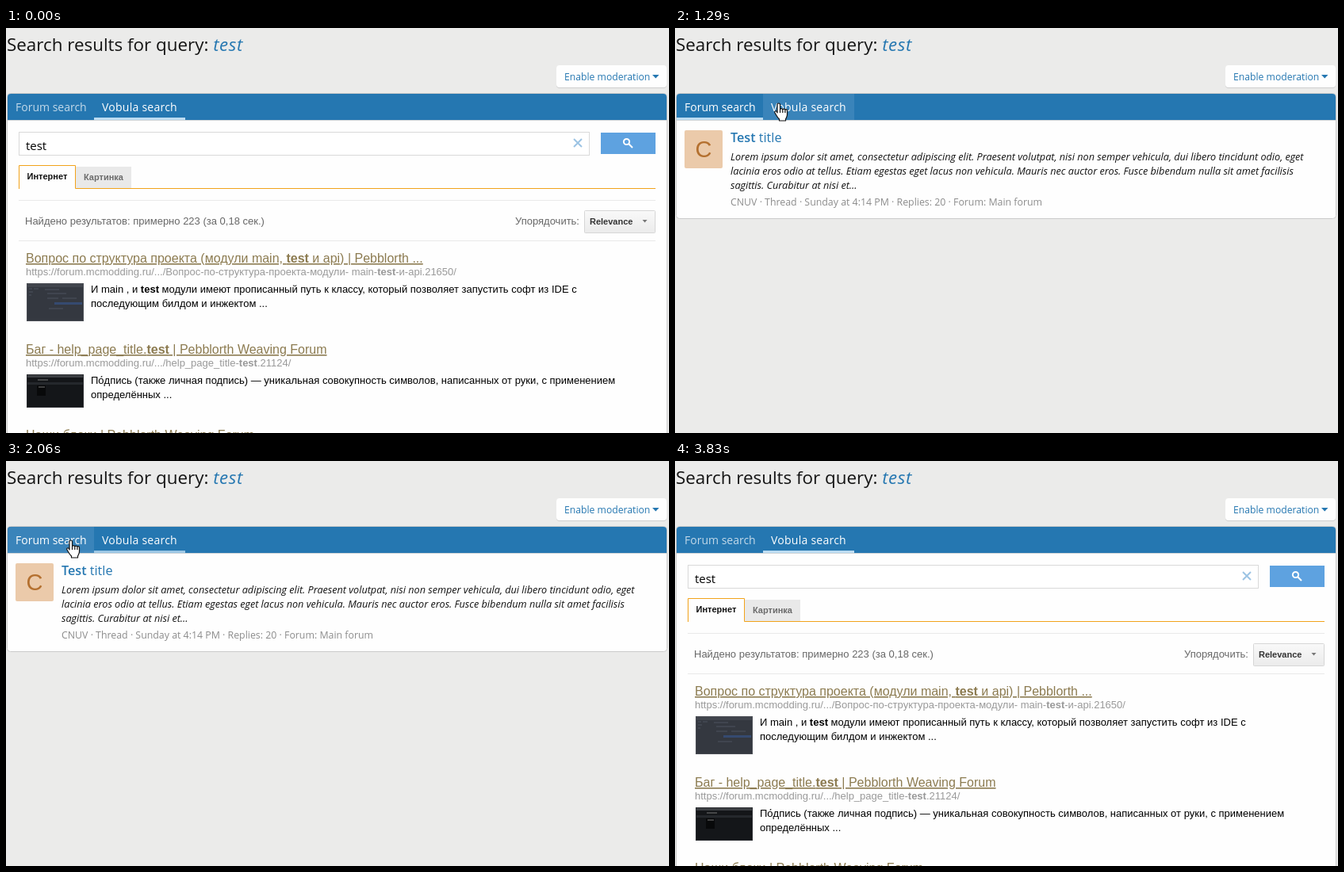
Animation of 836x511 px, one loop 4150 ms. Source, as an HTML page:

```html
<!DOCTYPE html>
<html lang="en">
<head>
<meta charset="utf-8">
<title>Search results</title>
<style>
html, body { margin: 0; width: 100%; height: 100%; overflow: hidden; background: #ebebea; }
svg { display: block; width: 836px; height: 511px; }
text { white-space: pre; }
.ui { font-family: "Open Sans", "Noto Sans", sans-serif; }
.web { font-family: "Liberation Sans", Arial, sans-serif; font-size: 13px; }
.b { font-weight: bold; }
.blue { fill: #2577b1; }
.small { font-size: 11px; font-weight: bold; }
.link { font-size: 16px; fill: #8c7b50; text-decoration: underline; }
.url { fill: #999; }

.a { animation: 4150ms step-end infinite; }
.forum-pane { animation-name: forum-pane; }
.web-pane { animation-name: web-pane; }
.forum-hover { animation-name: forum-hover; }
.web-hover { animation-name: web-hover; }
.forum-line { animation-name: forum-line; }
.web-line { animation-name: web-line; }
.forum-label { animation-name: forum-label; }
.web-label { animation-name: web-label; }
.cursor { animation-name: move; }
.hand { animation-name: hand; }
.arrow { animation-name: arrow; }

@keyframes forum-pane {
  0%, 34.69%, 68.19%, 100% { opacity: 0; }
  16.38%, 49.63% { opacity: 1; }
}
@keyframes web-pane {
  0%, 34.69%, 68.19%, 100% { opacity: 1; }
  16.38%, 49.63% { opacity: 0; }
}
@keyframes forum-hover {
  0%, 29.39%, 60.72%, 100% { opacity: 0; }
  10.6%, 38.55% { opacity: 0; animation-timing-function: linear; }
  12.28%, 40.48% { opacity: 1; }
  25.54%, 57.8% { opacity: 1; animation-timing-function: linear; }
}
@keyframes web-hover {
  0%, 40.48%, 75.66%, 100% { opacity: 0; }
  25.54%, 57.8% { opacity: 0; animation-timing-function: linear; }
  29.39%, 60.72% { opacity: 1; }
  37.5%, 71.8% { opacity: 1; animation-timing-function: linear; }
}
@keyframes forum-line {
  0%, 39.27%, 72%, 100% { opacity: 0; }
  16.38% { opacity: 0; animation-timing-function: linear; }
  21.5%, 53.25% { opacity: 1; }
  34.69% { opacity: 1; animation-timing-function: linear; }
  49.63% { opacity: .05; animation-timing-function: linear; }
  68.19% { opacity: .6; animation-timing-function: linear; }
}
@keyframes web-line {
  0%, 39.27%, 72%, 100% { opacity: 1; }
  16.38% { opacity: 1; animation-timing-function: linear; }
  21.5%, 53.25% { opacity: 0; }
  34.69% { opacity: 0; animation-timing-function: linear; }
  49.63% { opacity: .8; animation-timing-function: linear; }
  68.19% { opacity: .45; animation-timing-function: linear; }
}
@keyframes forum-label {
  0%, 38%, 72%, 100% { opacity: .72; }
  10.6%, 38.55% { opacity: .72; animation-timing-function: linear; }
  12.28%, 40.48% { opacity: 1; }
  34.69% { opacity: 1; animation-timing-function: linear; }
  68.19% { opacity: .9; animation-timing-function: linear; }
}
@keyframes web-label {
  0%, 29.39%, 60.72%, 100% { opacity: 1; }
  16.38%, 49.63% { opacity: 1; animation-timing-function: linear; }
  21.5%, 53.25% { opacity: .72; }
  25.54%, 57.8% { opacity: .72; animation-timing-function: linear; }
}
@keyframes hand {
  0%, 73.73%, 100% { opacity: 0; }
  10.6% { opacity: 1; }
}
@keyframes arrow {
  0%, 10.6%, 92.28%, 100% { opacity: 0; }
  1.68%, 73.73% { opacity: 1; }
}
@keyframes move {
  0%, 1.68% { transform: translate(722px, 412px); animation-timing-function: steps(2); }
  5.3% { transform: translate(430px, 262px); animation-timing-function: steps(2); }
  8.91% { transform: translate(130px, 128px); animation-timing-function: steps(2); }
  12.28% { transform: translate(39px, 91px); }
  21.92% { transform: translate(39px, 91px); animation-timing-function: steps(3); }
  27.46% { transform: translate(125px, 94px); }
  36.62% { transform: translate(125px, 94px); animation-timing-function: steps(2); }
  40.48% { transform: translate(92px, 95px); }
  42.16% { transform: translate(13px, 96px); }
  44.09% { transform: translate(76px, 99px); }
  55.18% { transform: translate(76px, 99px); animation-timing-function: steps(3); }
  60.72% { transform: translate(121px, 102px); }
  62.65% { transform: translate(123px, 102px); }
  64.57% { transform: translate(124px, 102px); }
  70.12% { transform: translate(124px, 102px); animation-timing-function: steps(5); }
  79.27% { transform: translate(486px, 289px); animation-timing-function: steps(6); }
  90.6%, 100% { transform: translate(757px, 493px); }
}
</style>
</head>
<body>
<svg viewBox="0 0 836 511">
  <defs>
    <linearGradient id="grey" x2="0" y2="1">
      <stop stop-color="#f9f9f9"/><stop offset="1" stop-color="#ebebeb"/>
    </linearGradient>
  </defs>

  <g class="ui">
    <text x="1" y="29" font-size="22.4" fill="#141414">Search results for query: <tspan class="blue" font-style="italic" letter-spacing=".6">test</tspan></text>
    <rect x="694" y="48" width="139" height="28" rx="4" fill="#cfcfcf"/>
    <rect x="694" y="47" width="139" height="28" rx="4" fill="#fefefe"/>
    <text class="blue" x="704" y="66" font-size="12.2">Enable moderation</text>
    <path class="blue" d="M815 59h8.5l-4.25 4.5z"/>
  </g>

  <!-- Forum results -->
  <g class="a forum-pane ui">
    <rect x="1.5" y="82.5" width="832" height="158" rx="4" fill="#fefefe" stroke="#cbcbcb"/>
    <rect x="12" y="129" width="48" height="48" rx="2" fill="#ebcaaa"/>
    <text class="web" x="36" y="163" style="font-size: 29px" text-anchor="middle" fill="#b4702f">C</text>
    <text class="blue" x="70" y="144" font-size="16.2"><tspan font-weight="600">Test</tspan> title</text>
    <g font-size="12.68" font-style="italic" fill="#141414">
      <text x="70" y="167">Lorem ipsum dolor sit amet, consectetur adipiscing elit. Praesent volutpat, nisi non semper vehicula, dui libero tincidunt odio, eget</text>
      <text x="70" y="185">lacinia eros odio at tellus. Etiam egestas eget lacus non vehicula. Mauris nec auctor eros. Fusce bibendum nulla sit amet facilisis</text>
      <text x="70" y="203">sagittis. Curabitur at nisi et...</text>
    </g>
    <text x="70" y="224" font-size="12.35" fill="#8c8c8c">CNUV · Thread · Sunday at 4:14 PM · Replies: 20 · Forum: Main forum</text>
  </g>

  <!-- Web results -->
  <g class="a web-pane web">
    <rect x="1.5" y="82.5" width="832" height="450" rx="4" fill="#fefefe" stroke="#cbcbcb"/>
    <rect x="16.5" y="131.5" width="719" height="29" fill="#fff" stroke="#d9d9d9"/>
    <text class="ui" x="25" y="154" font-size="15">test</text>
    <path d="M716 140l10 10m0-10l-10 10" stroke="#9cc4e4" stroke-width="2"/>
    <rect x="750" y="132" width="69" height="27" fill="#5ea2e0"/>
    <g fill="none" stroke="#fff" stroke-width="2"><circle cx="782.5" cy="143.5" r="3.6"/><path d="M785.5 146.5l4.5 4.5"/></g>

    <rect x="88" y="175" width="70" height="27" fill="#e9e9e9"/>
    <path d="M16.5 203V173.5H87.5V202.5H819" fill="none" stroke="#f2a31b"/>
    <text class="small" x="26.5" y="191" fill="#111">Интернет</text>
    <text class="small" x="98" y="192" fill="#6b6b6b">Картинка</text>

    <path d="M16 217.5h803M16 268.5h803" stroke="#e9e9e9"/>
    <g fill="#676767">
      <text x="24" y="248">Найдено результатов: примерно 223 (за 0,18 сек.)</text>
      <text x="723" y="248" text-anchor="end">Упорядочить:</text>
    </g>
    <rect x="729.5" y="230.5" width="89" height="28" rx="1" fill="url(#grey)" stroke="#d6d6d6"/>
    <text class="small" x="736" y="248" fill="#333">Relevance</text>
    <path d="M802.5 242h6l-3 3.5z" fill="#777"/>

    <text class="link" x="25" y="296">Вопрос по структура проекта (модули main, <tspan class="b">test</tspan> и api) | Pebblorth ...</text>
    <text class="url" x="25" y="312">https://forum.mcmodding.ru/.../Вопрос-по-структура-проекта-модули- main-<tspan class="b">test</tspan>-и-api.21650/</text>
    <text x="107" y="334">И main , и <tspan class="b">test</tspan> модули имеют прописанный путь к классу, который позволяет запустить софт из IDE с</text>
    <text x="107" y="352">последующим билдом и инжектом ...</text>
    <rect x="26.5" y="322.5" width="71" height="47" fill="#343840" stroke="#4b4e55"/>
    <path d="M27 323h70v4H27z" fill="#41454d"/>
    <path d="M29 329h4m2 0h6M29 333h5m-5 4h3M49 330h18M52 335h24M52 341h14m5 0h18M54 354h18" stroke="#4d535e"/>
    <path d="M61 347.5h35" stroke="#354a70" stroke-width="3"/>

    <text class="link" x="25" y="411">Баг - help_page_title.<tspan class="b">test</tspan> | Pebblorth Weaving Forum</text>
    <text class="url" x="25" y="427">https://forum.mcmodding.ru/.../help_page_title-<tspan class="b">test</tspan>.21124/</text>
    <text x="107" y="449">По́дпись (также личная подпись) — уникальная совокупность символов, написанных от руки, с применением</text>
    <text x="107" y="467">определённых ...</text>
    <rect x="26.5" y="437.5" width="71" height="41" fill="#141619" stroke="#2b2d31"/>
    <path d="M27 438h70v3H27z" fill="#3c3f43"/>
    <path d="M27 447h70v3H27z" fill="#25282c"/>
    <path d="M39 451h11v13H39z" fill="#08090a"/>
    <path d="M40 444h13m-12 9h8" stroke="#777"/>
    <text class="link" x="25" y="519">Наши блоки | Pebblorth Weaving Forum</text>
  </g>

  <!-- Tab bar -->
  <path d="M2 116V87a4 4 0 0 1 4-4h823a4 4 0 0 1 4 4v29z" fill="#2577b1"/>
  <path d="M2 116.5h831" stroke="#d3d6d8"/>
  <path class="a forum-hover" d="M2 116V87a4 4 0 0 1 4-4h105v33z" fill="#3a84ba"/>
  <rect class="a web-hover" x="111" y="83" width="115" height="33" fill="#3a84ba"/>
  <rect class="a forum-line" x="2" y="113" width="109" height="3" fill="#bddcf2"/>
  <rect class="a web-line" x="111" y="113" width="115" height="3" fill="#bddcf2"/>
  <g class="ui" font-size="14" fill="#fff">
    <text class="a forum-label" x="12" y="105">Forum search</text>
    <text class="a web-label" x="121" y="105" letter-spacing=".25">Vobula search</text>
  </g>

  <g class="a cursor" fill="#fff" stroke="#111" stroke-linejoin="round">
    <path class="a arrow" d="M.5.5v16l3.7-3.5 2.4 5.5 2.2-1-2.4-5.4h5z"/>
    <path class="a hand" stroke-width="1.2" d="M4 13V3q0-2 1.75-2T7.5 3v6q.3-1.3 1.6-1.3T10.8 9q.4-.9 1.5-.9t1.6 1.2q.3-.6 1.1-.6 1.5 0 1.5 1.8V15q0 2-1 4l-1 2v2H6.5v-2Q4.5 19 3 16.5L1 13q-.6-1.4.3-2t1.9.3zM7.5 9v4m3.3-4v4m3.1-3.5V13"/>
  </g>
</svg>
</body>
</html>
```
